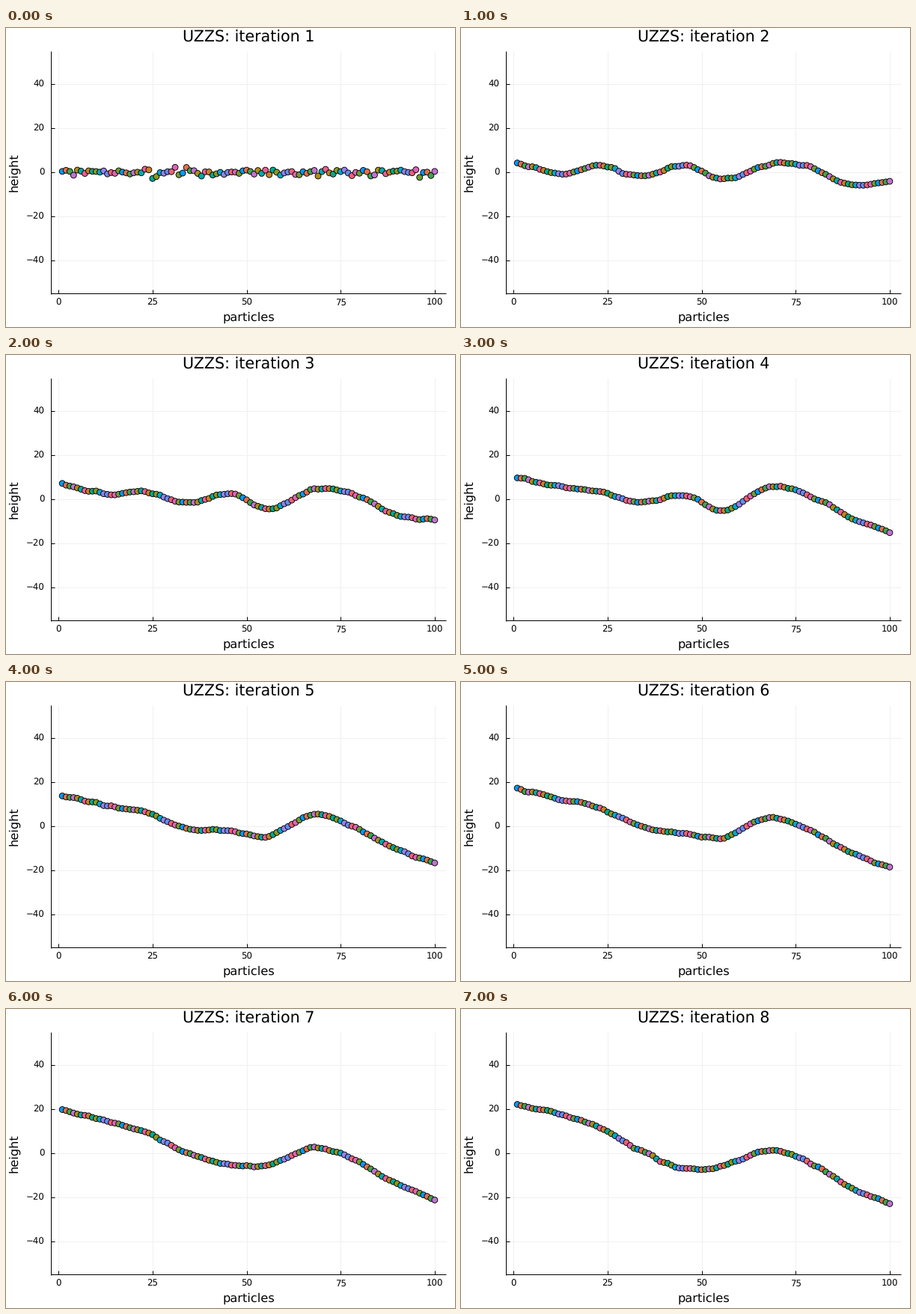
Recreate the animation shown at these times as a matplotlib script. Size 600x400 px, loop 8000 ms.

```python
import numpy as np
import matplotlib.pyplot as plt
from matplotlib.animation import FuncAnimation

W, H, DPI = 600, 400, 100
LEFT, RIGHT, TOP, BOTTOM = 60.3, 587.8, 30.5, 355.3
X_MIN, X_MAX, Y_LIM = -1.97, 102.97, 55
MID_X = 324.4
STEPS = 8

PALETTE = ["#009AFA", "#E36F47", "#3EA44E", "#C371D2", "#AC8E18", "#00AAAE",
           "#ED5E93", "#C68225", "#00A98D", "#8E971E", "#00A9CC", "#9B7FE9",
           "#618DF6", "#F06073", "#DD65B6", "#6C9F33"]

plt.rcParams["text.hinting"] = "none"
particles = np.arange(1, 101)

# The chain's bends, and their heights at a few iterations
BENDS = np.array([1, 14, 22, 34, 46, 55, 69, 77, 90, 100])
KEY_STEPS = [2, 4, 5, 8]
KEY_HEIGHTS = np.array([
    [4.2, -.7, 3, -1.9, 3.1, -3.3, 4, 3.2, -5.8, -3.9],
    [9.8, 5.2, 3.8, -1.4, 1.7, -5.2, 5.8, 2.9, -8.4, -15.2],
    [14, 9, 7, -.8, -2, -4.8, 5.4, 1, -10.4, -16.5],
    [22.6, 16.6, 12.4, 1, -7, -6.2, 1.2, -3, -15.8, -22.7],
])


def smooth_curve(x, xs, ys):
    """Cubic Hermite curve through the points (xs, ys)."""
    slopes = np.gradient(ys, xs)
    i = np.clip(np.searchsorted(xs, x, side="right") - 1, 0, len(xs) - 2)
    span = xs[i + 1] - xs[i]
    t = (x - xs[i]) / span
    ease = t * t * (3 - 2 * t)
    bow = t * (1 - t) * ((1 - t) * slopes[i] - t * slopes[i + 1])
    return ys[i] + ease * (ys[i + 1] - ys[i]) + bow * span


def heights(n):
    noise = np.random.default_rng(n).normal(0, 1, particles.size)
    if n == 1:
        return 1.05 * noise
    bends = np.array([np.interp(n, KEY_STEPS, h) for h in KEY_HEIGHTS.T])
    rough = np.convolve(noise, [.25, .5, .25], mode="same")
    return smooth_curve(particles, BENDS, bends) + .4 * rough


def px(x):
    return LEFT + (x - X_MIN) / (X_MAX - X_MIN) * (RIGHT - LEFT)


def py(y):
    return BOTTOM - (y + Y_LIM) / (2 * Y_LIM) * (BOTTOM - TOP)


def pt(pixels):
    return pixels * 72 / DPI


fig = plt.figure(figsize=(W / DPI, H / DPI), dpi=DPI, facecolor="white")
ax = fig.add_axes([0, 0, 1, 1])
ax.set(xlim=(0, W), ylim=(H, 0))
ax.axis("off")


def line(x0, y0, x1, y1, color="black"):
    ax.plot([x0, x1], [y0, y1], color=color, lw=pt(1),
            solid_capstyle="butt")


def label(x, y, text, size, ha="center", va="baseline", rotation=0):
    return ax.text(x, y, text, fontsize=pt(size), family="DejaVu Sans",
                   ha=ha, va=va, rotation=rotation)


x_ticks, y_ticks = range(0, 101, 25), range(-40, 41, 20)
for x in x_ticks:
    line(px(x), TOP, px(x), BOTTOM, "#f0f0f0")
for y in y_ticks:
    line(LEFT, py(y), RIGHT, py(y), "#f0f0f0")

line(LEFT, BOTTOM, RIGHT, BOTTOM)
line(LEFT, TOP, LEFT, BOTTOM + .5)
for x in x_ticks:
    line(px(x), BOTTOM, px(x), BOTTOM - 5)
    label(px(x), 370.7, str(x), 11.8)
for y in y_ticks:
    line(LEFT, py(y), LEFT + 5, py(y))
    label(51.6, py(y) + 4.3, str(y).replace("-", "\u2212"), 11.8, "right")

label(MID_X, 392, "particles", 16.2)
label(18.3, 193, "height", 16.2, "right", "center", 90)
title = label(MID_X, 18.8, "", 20.7)

dots = ax.scatter(px(particles), py(heights(1)), s=pt(7.9) ** 2,
                  c=[PALETTE[i % len(PALETTE)] for i in range(100)],
                  edgecolors="black", linewidths=pt(.9), zorder=3)


def update(i):
    n = i + 1
    title.set_text(f"UZZS: iteration {n}")
    dots.set_offsets(np.column_stack([px(particles), py(heights(n))]))
    return title, dots


anim = FuncAnimation(fig, update, frames=STEPS, interval=1000, repeat=True,
                     repeat_delay=0)
plt.show()
```
